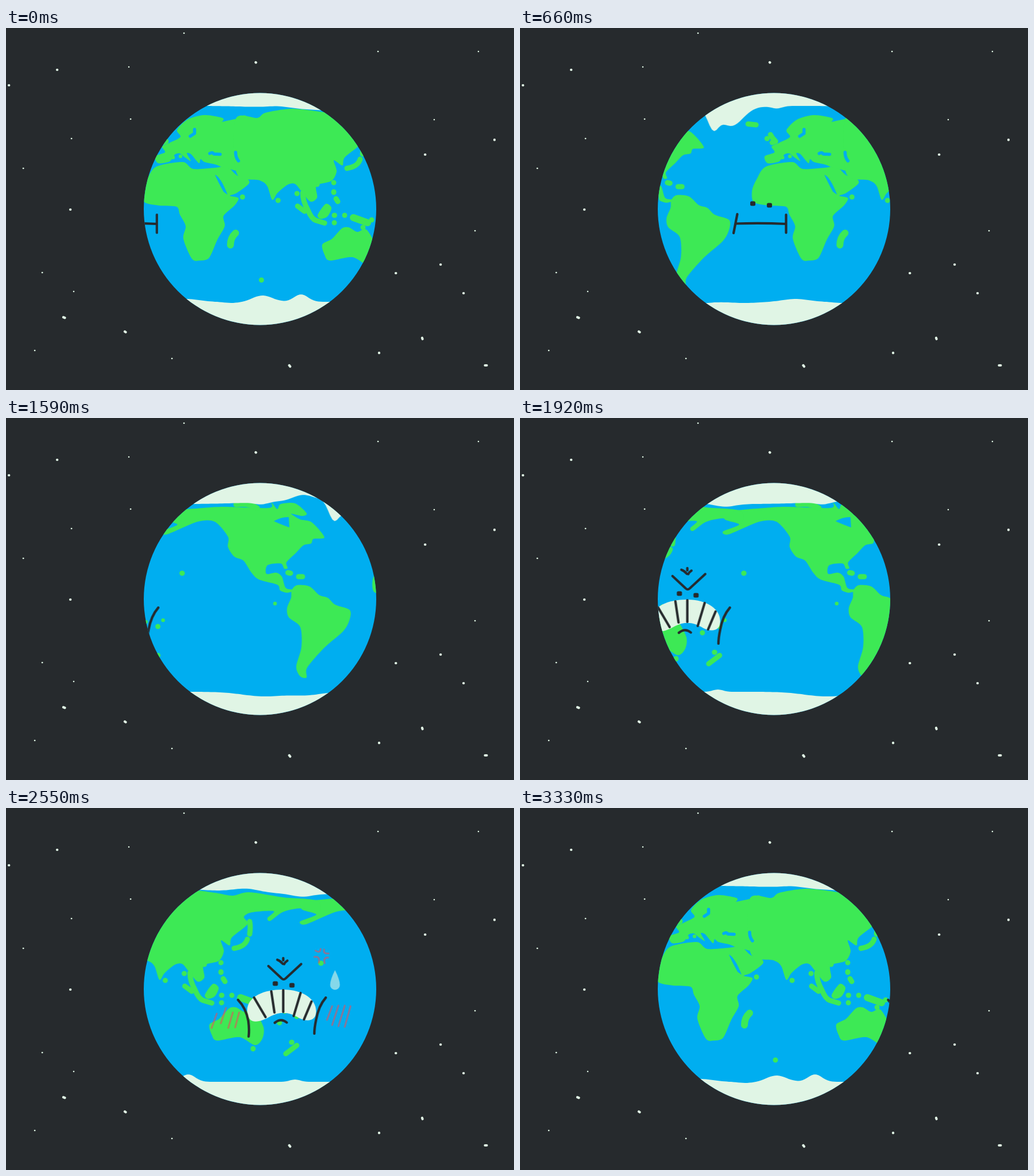
Animation of 885 by 632 pixels, one loop 3360 ms. Source, as an HTML page:

```html
<!DOCTYPE html>
<html lang="en">
<head>
<meta charset="utf-8">
<title>Moody planet</title>
<style>
  html, body { margin: 0; width: 100%; height: 100%; overflow: hidden; background: #262a2d; }
  svg { display: block; width: 885px; height: 632px; }
  .land { fill: #3de955; }
  .sea { fill: #00aef0; }
  .ice { fill: #e0f5e5; }
  .line { fill: none; stroke-width: 4.2; stroke-linecap: round; stroke-linejoin: round; }
  .coast { stroke: #3de955; stroke-width: 9; }
  .inlet { stroke: #00aef0; stroke-width: 5.5; }
  .ink { stroke: #262a2d; }
  .flush { stroke: #e8505b; stroke-width: 3; }
  .star { stroke: #e0f5e5; }
  .thin { stroke-width: 2.6; }
  .wide { stroke-width: 12; }
  #map, #calm, #cross { animation: 3360ms steps(112, jump-none) infinite; }
  #map { animation-name: spin; }
  #calm { animation-name: calm; }
  #cross { animation-name: cross; }
  #teeth { animation: bare 3360ms linear infinite; }
  #extras { animation: strain 3360ms linear infinite; }
  @keyframes spin { to { transform: translateX(839px); } }
  @keyframes calm { from { transform: translateX(-200.6px); } to { transform: translateX(811.7px); } }
  @keyframes cross { from { transform: translateX(-684px); } to { transform: translateX(328.3px); } }
  @keyframes bare { 0%, 48.2% { opacity: 0; } 52%, 100% { opacity: 1; } }
  @keyframes strain {
    0%, 65.2%, 83%, 100% { opacity: 0; }
    72.3%, 75.9% { opacity: .6; }
  }
</style>
</head>
<body>
<svg viewBox="0 0 885 632">
  <defs>
    <clipPath id="disc"><circle cx="442.5" cy="316" r="202.5"/></clipPath>
    <rect id="eye" width="9" height="8" rx="2.5" fill="#262a2d"/>
  </defs>
  <rect width="885" height="632" fill="#262a2d"/>

  <path class="line star thin" d="M310 9h.2 M648 41h.2 M823 41h0 M214 68h0 M217 159h.2 M746 160h0 M114 193h.2
    M30 245h.3 M817 354h.2 M63 427h.3 M118 460h0 M50 563h.2 M289 577h.2"/>
  <path class="line star" d="M435 60l.4.3 M89 73h.3 M5 100h.3 M851 195v.4 M730 221h.4 M112 317h.3 M757 413h.3
    M679 428h.4 M797 463h.3 M100 505l2.500 1 M207 530l1.500 1 M725 541l.6 2 M650 567v.5 M493.500 589l1.500 2 M834.500 589h3"/>

  <g clip-path="url(#disc)">
    <rect class="sea" x="238" y="111" width="410" height="410"/>
    <g id="map">
      <g id="world">
        <g id="lands"></g>

        <!-- islands and narrow land -->
        <path class="line coast" d="M231 167.500L245 169 M264 193h.3 M270 186Q273 192 279 198L273 200 M412 295h0 M474 301h0
          M507 289h0 M542 273h0 M571 270h0 M571 286v1 M575 298L578 303 M572 327h.5 M590 327h0 M572 340h0
          M637 335h0 M622 348h0 M673 375h0 M703 364h0 M694 409h.5 M627 420v.5 M745 271h.4 M445 440h0"/>
        <path class="line coast" d="M621 198Q623 208 621 220 M594 245Q613 242 617 229 M517 288Q517 302 526 318
          Q532 333 540 336L555 340.500 M508 311L520 320 M684 429L703 414.500 M0 151Q25 149 37 157
          M90.500 270L95 271 M109 277H116"/>
        <path class="line coast wide" d="M400 358Q391 366 391 379 M605 331L630 340"/>
        <path class="line coast" style="stroke-width:6.500" d="M291 226h0 M304 224h0 M682 356h0 M712 353h0 M68 324h0"/>

        <!-- inland waters -->
        <path class="line inlet" d="M328.500 177V184L321 189 M355 219Q360 216 362 220L373 220.500 M400 217Q400 226 405 232"/>
        <path class="sea" d="M364 256Q374 260 386 291L379 286Q368 266 364 256 M66 180Q80 172 92 173L93 191Q74 184 66 180"/>
        <g id="poles"></g>
      </g>
      <use href="#world" x="-839"/>
    </g>

    <g id="calm">
      <use href="#eye" x="401" y="302.500"/>
      <use href="#eye" x="430" y="305.500"/>
      <path class="line ink" d="M378.500 325L372 358 M376 341.500Q420 340 463 342 M463.500 326V357.500"/>
    </g>

    <g id="cross">
      <g id="extras">
        <path class="line flush" d="M477 346L468 370 M488 345L477 379 M499 345L488 381 M509 346L499 382
          M276 359L267 384 M292 349L283 376 M304 357L296 384 M315 357L308 383"/>
        <path class="line flush" d="M448 249Q456 254 457 246 M463 247Q461 255 471 254 M446 260Q456 258 454 270 M470 261Q461 261 464 271"/>
        <path class="ice" d="M482 283Q473.500 300 473.500 309A8.500 8.500 0 0 0 490.500 309Q490.500 300 482 283"/>
      </g>
      <use href="#eye" x="373.500" y="302.500"/>
      <use href="#eye" x="402.500" y="305.500"/>
      <g id="teeth">
        <path class="ice" d="M329 354C329 328 360 317 390 317C430 317 449 336 449 354C450 372 434 374 420 367
          C402 356 388 355 371 363C350 375 330 380 329 354"/>
        <path class="line ink" d="M341 331L361 365 M371 320L376.500 357 M391.800 318V356 M422 323L410 363 M441 338L428 369"/>
      </g>
      <path class="line ink" d="M313 335Q327 349 331 372Q333 388 331.500 399 M466 331Q453 346 449 370Q446 384 446 394"/>
      <path class="line ink" d="M377 375Q388 366 398 374.500 M366 276L389 297.500Q392 301 396 297.500L423 272.500"/>
      <path class="line ink" d="M381.500 265Q387 267 391 272 M399 266.500Q395 269 393.500 272.500 M391.800 262V266"/>
    </g>
  </g>
</svg>

<script>
const LAP = 839;

function addPath(id, cls, d) {
  const el = document.createElementNS('http://www.w3.org/2000/svg', 'path');
  el.setAttribute('class', cls);
  el.setAttribute('d', d);
  document.getElementById(id).appendChild(el);
}

// Smooth closed coast through a few key points, "x,y x,y ..."
function land(text) {
  const p = text.split(/\s+/).map(s => s.split(',').map(Number));
  const n = p.length, at = i => p[(i + n) % n];
  let d = 'M' + p[0];
  for (let i = 0; i < n; i++) {
    const [a, b, c, e] = [at(i - 1), at(i), at(i + 1), at(i + 2)];
    const out = b.map((v, k) => v + (c[k] - a[k]) / 7);
    const into = c.map((v, k) => v - (e[k] - b[k]) / 7);
    d += `C${out} ${into} ${c}`;
  }
  addPath('lands', 'land', d + 'Z');
}

// Ice edge: a base curve plus bell-shaped bumps [centre, width, height]
function ice(rim, base, bumps) {
  let d = `M-72 ${rim}`;
  for (let x = -72; x <= LAP - 68; x += 4) {
    const y = bumps.reduce((sum, [c, w, h]) => sum + h * Math.exp(-(((x - c) / w) ** 2) / 2), base(x));
    d += `L${x} ${y.toFixed(1)}`;
  }
  addPath('poles', 'ice', d + `V${rim}Z`);
}

ice(90, x => 143 - 7 * Math.cos((x - 330) / LAP * 2 * Math.PI),
  [[44, 12, 4], [116, 16, -9], [170, 9, 30], [202, 20, 32], [281, 9, 4], [475, 20, -3], [615, 22, -6], [712, 18, 5]]);
ice(540, () => 478,
  [[50, 38, 8], [125, 25, 5], [225, 25, 2], [314, 22, -5], [395, 15, 2], [447, 17, -11], [514, 12, -13], [700, 9, -4]]);

// Africa and Arabia
land(`262,242 308,234 326,246 364,244 385,242 402,257 420,263 423,272 402,288 390,293 405,297 398,310 379,328
  381,346 368,370 354,401 338,406 324,403 309,368 313,346 303,326 297,312 267,310 241,304 238,284 246,264`);

// Europe
land(`298,178 316,160 345,152 377,157 376,164 367,166 400,159 420,158 420,245 385,245 364,238 346,234 339,229
  336,236 322,220 315,219 322,232 312,226 303,219 294,221 285,233 265,236 260,224 277,217 272,207 286,200 304,190`);

// Asia and Borneo
land(`400,159 438,157 452,148 500,141 561,148 591,153 620,147 680,156 740,162 740,184 712,175 680,181 657,197
  652,192 663,180 625,182 611,190 617,203 590,226 586,240 571,231 576,250 567,267 541,275 542,296 530,303
  514,284 503,272 490,274 473,288 464,300 455,276 442,266 402,254`);
land('543,326 557,307 567,314 560,329 548,333');

// Australia
land('551,378 568,368 585,350 597,348 612,356 628,352 645,382 643,403 630,414 603,400 564,406 555,396');

// The Americas
land(`-130,198 -102,186 -127,177 -127,164 -57,157 -20,155 57,157 62,148 72,159 78,150 103,149 123,166 116,171
  96,167 112,177 132,182 154,208 135,211 131,219 118,222 104,236 88,252 90,262 84,263 78,254 55,257 53,272
  70,270 80,277 87,297 104,300 90,305 77,301 72,291 40,282 27,270 13,249 -3,242 -14,225 -14,207 -37,181
  -67,181 -120,203`);
land(`97,301 106,292 128,294 145,309 160,314 173,326 198,335 198,352 187,372 153,402 124,436 123,453 112,451
  105,434 114,400 112,365 92,348 89,332 96,314`);
</script>
</body>
</html>
```
